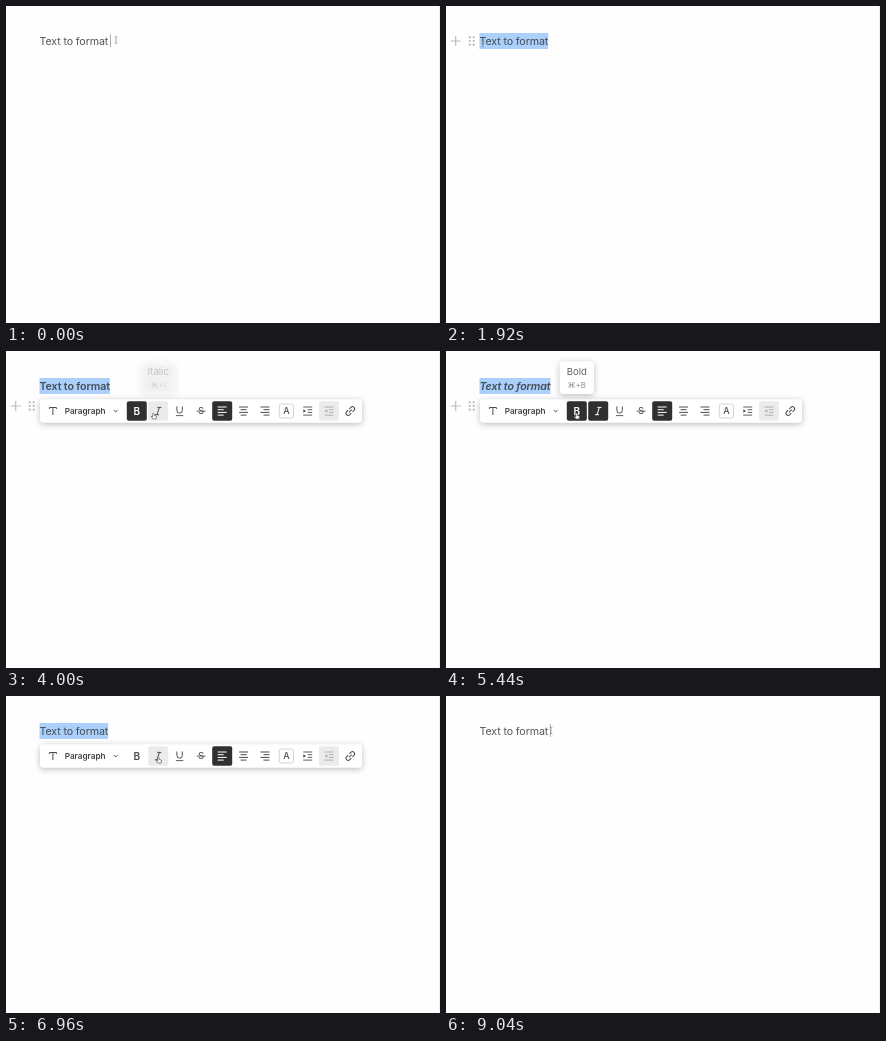
An HTML page with a canvas for the animation above (9.36 s loop, 434x317 px).

```html
<!DOCTYPE html>
<html lang="en">
<head>
<meta charset="utf-8">
<title>Text formatting toolbar</title>
<style>
  html, body { margin: 0; width: 100%; height: 100%; overflow: hidden; background: #fefefe; }
  canvas { display: block; width: 434px; height: 317px; }
</style>
</head>
<body>
<canvas id="stage"></canvas>
<script>
const W = 434, H = 317, LOOP = 9360;
const canvas = document.getElementById('stage');
const ctx = canvas.getContext('2d');
const dpr = window.devicePixelRatio || 1;
canvas.width = W * dpr;
canvas.height = H * dpr;

const INK = '#4c4c4c', DARK = '#303030', HOVER = '#ebebeb', FADED = '#aaa';
const TEXT = 'Text to format', TEXT_X = 33.5;
const BOLD_X = 130.8, ITALIC_X = 152.2, MID_Y = 60;

const clamp = v => Math.max(0, Math.min(1, v));
const ease = v => v * v * (3 - 2 * v);
const between = (t, a, b) => t >= a && t < b;
// Opacity of something that shows at `a` and hides from `b`.
const fade = (t, a, b, rise = 160, fall = 120) =>
  Math.min(clamp((t - a) / rise), 1 - clamp((t - b) / fall));

// Pointer stops: time, x, y of the hot spot.
const stops = [
  [0, 110, 34], [880, 110, 34], [1040, 105, 35], [1120, 105, 35],
  [1720, 34.5, 37], [1840, 34.5, 37], [2780, 130.5, 63],
  [3780, 130.5, 63], [4100, 152.5, 63], [4640, 152.5, 63],
  [5060, 130.5, 63], [5780, 130.5, 63], [6080, 152.5, 62],
  [7160, 152.5, 62], [7900, 105, 34.5], [LOOP, 105, 34.5]
];

function pointerAt(t) {
  const i = Math.max(1, stops.findIndex(s => s[0] > t));
  const [t0, x0, y0] = stops[i - 1], [t1, x1, y1] = stops[i];
  const p = ease((t - t0) / (t1 - t0));
  return { x: x0 + (x1 - x0) * p, y: y0 + (y1 - y0) * p };
}

function withAlpha(alpha, draw) {
  if (alpha <= 0) return;
  ctx.save();
  ctx.globalAlpha *= alpha;
  draw();
  ctx.restore();
}

function box(x, y, w, h, r, fill, stroke) {
  ctx.beginPath();
  ctx.roundRect(x, y, w, h, r);
  if (fill) { ctx.fillStyle = fill; ctx.fill(); }
  if (stroke) { ctx.strokeStyle = stroke; ctx.lineWidth = 0.8; ctx.stroke(); }
}

function panel(x, y, w, h, r) {
  ctx.save();
  ctx.shadowColor = 'rgba(0,0,0,.26)';
  ctx.shadowBlur = 6 * dpr;
  ctx.shadowOffsetY = 1.5 * dpr;
  box(x, y, w, h, r, '#fff');
  ctx.restore();
}

function label(text, x, y, font, color, align = 'center') {
  ctx.font = font + ' Inter, sans-serif';
  ctx.textAlign = align;
  ctx.fillStyle = color;
  ctx.fillText(text, x, y);
}

// Each argument is a polyline given as x, y, x, y...
function lines(color, width, ...paths) {
  ctx.strokeStyle = color;
  ctx.lineWidth = width;
  ctx.beginPath();
  for (const p of paths)
    for (let i = 0; i < p.length; i += 2)
      i ? ctx.lineTo(p[i], p[i + 1]) : ctx.moveTo(p[i], p[i + 1]);
  ctx.stroke();
}

function button(x, color) {
  box(x - 10, 50.3, 20, 19.4, 2, color);
}

function alignIcon(x, side, color) {
  const rows = [9, 6, 9, 6].map((w, i) => {
    const left = x - 4.5 + (9 - w) * side, y = 56 + i * 2.7;
    return [left, y, left + w, y];
  });
  lines(color, 1, ...rows);
}

function indentIcon(x, dir, color) {
  lines(color, 0.9,
    [x - 4.5, 56, x + 4.5, 56], [x, 58.7, x + 4.5, 58.7],
    [x, 61.4, x + 4.5, 61.4], [x - 4.5, 64.1, x + 4.5, 64.1]);
  const a = x - 3 - dir * 1.4, b = x - 3 + dir * 1.4;
  ctx.fillStyle = color;
  ctx.beginPath();
  ctx.moveTo(a, 58.2);
  ctx.lineTo(b, 60);
  ctx.lineTo(a, 61.8);
  ctx.fill();
}

function linkIcon(x) {
  ctx.save();
  ctx.translate(x, MID_Y);
  ctx.rotate(-Math.PI / 4);
  ctx.strokeStyle = INK;
  ctx.lineWidth = 1;
  for (const side of [-1, 1]) {
    ctx.beginPath();
    ctx.moveTo(side * 0.9, -2.2);
    ctx.lineTo(side * 3, -2.2);
    ctx.arc(side * 3, 0, 2.2, -Math.PI / 2, Math.PI / 2, side < 0);
    ctx.lineTo(side * 0.9, 2.2);
    ctx.stroke();
  }
  lines(INK, 1, [-2, 0, 2, 0]);
  ctx.restore();
}

function boldIcon(color) {
  label('B', BOLD_X, 63.6, '600 10px', color);
}

function italicIcon(color) {
  const x = ITALIC_X;
  lines(color, 1, [x - 0.8, 56.4, x + 3.2, 56.4],
    [x + 1.2, 56.4, x - 1.2, 63.7], [x - 3.2, 63.7, x + 0.8, 63.7]);
}

function toggle(x, icon, hovered, active) {
  if (hovered) button(x, HOVER);
  icon(INK);
  withAlpha(active, () => { button(x, DARK); icon('#fff'); });
}

function toolbar(t, pointer) {
  panel(34, 48.3, 322, 23.4, 3.5);
  lines(INK, 1, [43.4, 58, 43.4, 56.5, 50.4, 56.5, 50.4, 58], [46.9, 56.5, 46.9, 64]);
  label('Paragraph', 58.7, 62.9, '600 8.2px', '#444', 'left');
  lines(INK, 1, [107.8, 59, 109.7, 60.9, 111.6, 59]);

  const over = x => pointer.y > 50 && Math.abs(pointer.x - x) < 10.5;
  toggle(BOLD_X, boldIcon, over(BOLD_X), fade(t, 3400, 5600, 120, 160));
  toggle(ITALIC_X, italicIcon, over(ITALIC_X), fade(t, 4320, 6600, 120, 200));

  ctx.strokeStyle = INK;
  ctx.lineWidth = 1;
  ctx.beginPath();
  ctx.moveTo(170.9, 55.5);
  ctx.lineTo(170.9, 59.5);
  ctx.arc(173.6, 59.5, 2.7, Math.PI, 0, true);
  ctx.lineTo(176.3, 55.5);
  ctx.stroke();
  lines(INK, 0.9, [169.9, 64.6, 177.3, 64.6]);

  label('S', 195, 63.4, '9.5px', INK);
  lines(INK, 0.9, [190.6, 60.1, 199.4, 60.1]);

  button(216.2, DARK);
  alignIcon(216.2, 0, '#fff');
  alignIcon(237.6, 0.5, INK);
  alignIcon(259, 1, INK);

  box(273.3, 53, 14.2, 14, 2, '#fff', '#c9c9c9');
  label('A', 280.4, 63.3, '500 9px', INK);
  indentIcon(301.7, 1, INK);
  button(323, HOVER);
  indentIcon(323, -1, FADED);
  linkIcon(344.3);
}

function tooltip(x, name, keys, alpha) {
  withAlpha(alpha, () => {
    panel(x - 17.2, 10.3, 34.4, 32.8, 4);
    label(name, x, 23.6, '9.6px', '#606060');
    label(keys, x, 36.6, '8px', '#909090');
  });
}

function handles(y) {
  lines('#b9b9b9', 1.1, [4.7, y, 14.7, y], [9.7, y - 5, 9.7, y + 5]);
  ctx.fillStyle = '#b5b5b5';
  for (let i = 0; i < 6; i++) {
    ctx.beginPath();
    ctx.arc(23.8 + (i % 2) * 3.9, y + (Math.floor(i / 2) - 1) * 3.7, 1.1, 0, 7);
    ctx.fill();
  }
}

function paragraph(t, pointer) {
  const bold = between(t, 3440, 5740), italic = between(t, 4360, 6800);
  ctx.font = `${italic ? 'italic ' : ''}${bold ? 600 : 400} 10.67px Inter, sans-serif`;
  ctx.letterSpacing = '-0.117px';
  ctx.textAlign = 'left';
  const end = TEXT_X + ctx.measureText(TEXT).width;
  if (between(t, 1120, 7960)) {
    const start = t < 1720 ? Math.min(end, Math.max(TEXT_X, pointer.x)) : TEXT_X;
    ctx.fillStyle = '#abd0fb';
    ctx.fillRect(start, 27, end - start, 16);
  }
  ctx.fillStyle = 'rgba(38,38,38,.78)';
  ctx.fillText(TEXT, TEXT_X, 38.8);
  ctx.letterSpacing = '0px';
}

function caret(t) {
  const on = t < 160 || between(t, 640, 1120) || between(t, 7960, 8480) || t >= 8960;
  if (on) lines('#b0b0b0', 1, [104.5, 28, 104.5, 41]);
}

function cursor({ x, y }) {
  if (y < 47) {
    lines('#8c8c8c', 0.7, [x - 1.5, y - 3.5, x, y - 2.8, x + 1.5, y - 3.5],
      [x, y - 2.8, x, y + 2.8], [x - 1.5, y + 3.5, x, y + 2.8, x + 1.5, y + 3.5]);
    return;
  }
  ctx.beginPath();
  ctx.moveTo(x - 0.8, y + 3);
  ctx.lineTo(x - 0.8, y - 0.3);
  ctx.quadraticCurveTo(x, y - 1.2, x + 0.7, y - 0.3);
  ctx.lineTo(x + 0.7, y + 1.5);
  ctx.lineTo(x + 3, y + 2);
  ctx.lineTo(x + 2.6, y + 5);
  ctx.lineTo(x - 0.6, y + 5);
  ctx.lineTo(x - 2.4, y + 2.4);
  ctx.closePath();
  ctx.fillStyle = '#fff';
  ctx.fill();
  ctx.strokeStyle = '#606060';
  ctx.lineWidth = 0.7;
  ctx.stroke();
}

function render(t) {
  const pointer = pointerAt(t);
  ctx.setTransform(dpr, 0, 0, dpr, 0, 0);
  ctx.fillStyle = '#fefefe';
  ctx.fillRect(0, 0, W, H);
  ctx.fillStyle = '#eeeeee';
  ctx.fillRect(433, 0, 1, H);

  const handleAlpha = Math.max(fade(t, 880, 6600, 160, 200), fade(t, 7280, 7960));
  withAlpha(handleAlpha, () => handles(pointer.y > 47 ? 55 : 35));
  paragraph(t, pointer);
  caret(t);
  withAlpha(fade(t, 1980, 7960, 200, 240), () => toolbar(t, pointer));

  tooltip(BOLD_X, 'Bold', '⌘+B', Math.max(fade(t, 2880, 3800), fade(t, 5120, 5860)));
  tooltip(ITALIC_X, 'Italic', '⌘+I',
    Math.max(fade(t, 3940, 4560, 200), fade(t, 6000, 6600, 200, 200)));
  cursor(pointer);
}

function frame(now) {
  render(now % LOOP);
  requestAnimationFrame(frame);
}
requestAnimationFrame(frame);
</script>
</body>
</html>
```
